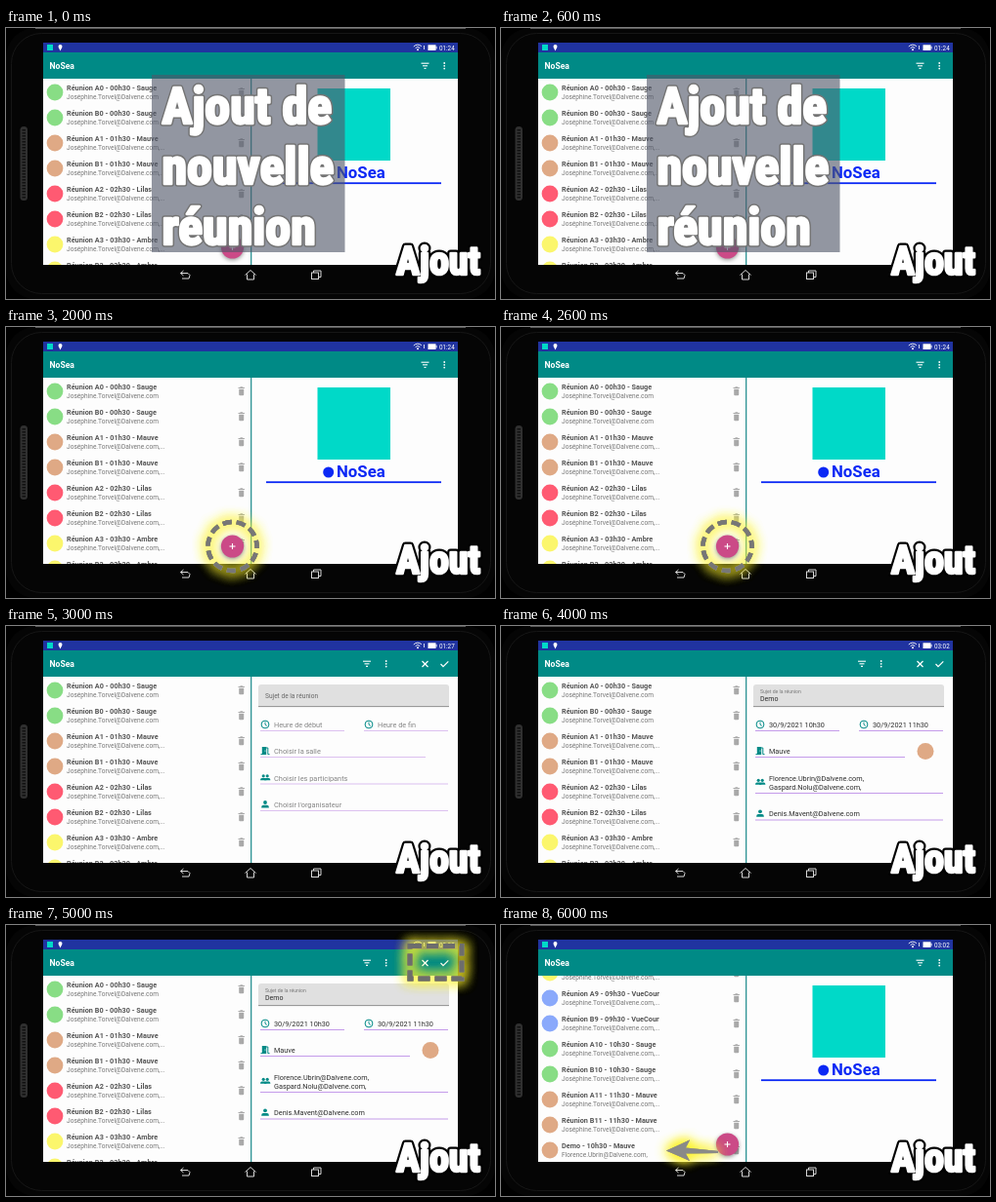
Recreate the animation shown at these times as an HTML page with a canvas. Size 500 by 278 pixels, loop 7000 ms.

```html
<!DOCTYPE html>
<html lang="fr">
<head>
<meta charset="utf-8">
<title>Ajout de nouvelle réunion</title>
<style>
  html, body { margin: 0; width: 100%; height: 100%; overflow: hidden; background: #000; }
  canvas { display: block; width: 500px; height: 278px; }
</style>
</head>
<body>
<canvas id="stage"></canvas>
<script>
const canvas = document.getElementById("stage");
const ctx = canvas.getContext("2d");
const ratio = window.devicePixelRatio || 1;
canvas.width = 500 * ratio;
canvas.height = 278 * ratio;

const TEAL = "#008a86", BLUE = "#0b28f5", LOGO = "#00d9c8", GREY = "#777", BIN = "#a9a9a9";
const GREEN = "#88dd85", TAN = "#dfa985", RED = "#ff5a72", YELLOW = "#fbf66c", SKY = "#8aa9fb";
const APP = "NoSea";
const HOST = "@Dalvene.com";
const OWNER = "Joséphine.Torvel" + HOST;
const GUEST = "Florence.Ubrin" + HOST + ",";
const ROOMS = [["Sauge", GREEN], ["Mauve", TAN], ["Lilas", RED], ["Ambre", YELLOW]];

// One entry per second of the loop.
const SCENES = [
  { time: "01:24", intro: true },
  { time: "01:24" },
  { time: "01:24", mark: ringMark },
  { time: "01:27", form: emptyForm },
  { time: "03:02", form: filledForm },
  { time: "03:02", form: filledForm, mark: boxMark },
  { time: "03:02", scrolled: true, mark: arrowMark }
];

function rect(x, y, w, h, color) {
  ctx.fillStyle = color;
  ctx.fillRect(x, y, w, h);
}

function round(x, y, w, h, r, color) {
  ctx.fillStyle = color;
  ctx.beginPath();
  ctx.roundRect(x, y, w, h, r);
  ctx.fill();
}

function disc(x, y, r, color) {
  ctx.fillStyle = color;
  ctx.beginPath();
  ctx.arc(x, y, r, 0, Math.PI * 2);
  ctx.fill();
}

function line(color, width, ...points) {
  ctx.strokeStyle = color;
  ctx.lineWidth = width;
  ctx.beginPath();
  points.forEach(([x, y]) => ctx.lineTo(x, y));
  ctx.stroke();
}

function polygon(color, ...points) {
  ctx.fillStyle = color;
  ctx.beginPath();
  points.forEach(([x, y]) => ctx.lineTo(x, y));
  ctx.fill();
}

function text(str, x, y, size, color, weight = 400) {
  ctx.font = `${weight} ${size}px Roboto, sans-serif`;
  ctx.fillStyle = color;
  ctx.fillText(str, x, y);
}

// Heavy condensed caption; the font size follows from the longest line.
function caption(lines, x, y, leading, maxSize, room, edge, edgeWidth) {
  ctx.save();
  ctx.fontStretch = "condensed";
  const setSize = size => ctx.font = `900 ${size}px "Roboto Condensed", Roboto, sans-serif`;
  setSize(maxSize);
  const widest = Math.max(...lines.map(s => ctx.measureText(s).width));
  setSize(maxSize * Math.min(1, room / widest));
  ctx.lineJoin = "round";
  lines.forEach((str, i) => {
    const base = y + i * leading;
    ctx.strokeStyle = edge;
    ctx.lineWidth = edgeWidth;
    ctx.strokeText(str, x, base);
    ctx.strokeStyle = ctx.fillStyle = "#fff";
    ctx.lineWidth = 2.6;
    ctx.strokeText(str, x, base);
    ctx.fillText(str, x, base);
  });
  ctx.restore();
}

function tablet() {
  rect(0, 0, 500, 278, "#000");
  round(0, 0, 500, 278, 30, "#050505");
  line("#555", 1, [30, 0.5], [470, 0.5]);
  ctx.strokeStyle = "#161616";
  ctx.lineWidth = 1;
  ctx.beginPath();
  ctx.roundRect(5.5, 5.5, 490, 267, 31);
  ctx.stroke();
  round(14.5, 101, 7.5, 76, 3.5, "#303030");
  for (let y = 104; y < 176; y += 3) rect(16.5, y, 3.5, 1.5, "#111");
}

function statusBar(time) {
  rect(38, 15, 424, 10, "#2033a0");
  rect(42, 17, 6, 6, LOGO);
  disc(55.5, 19, 2, "#fff");
  polygon("#fff", [53.8, 20], [57.2, 20], [55.5, 23.5]);
  ctx.strokeStyle = "#fff";
  ctx.lineWidth = 0.9;
  for (const r of [3.2, 5.6]) {
    ctx.beginPath();
    ctx.arc(421, 22.8, r, -Math.PI * 0.77, -Math.PI * 0.23);
    ctx.stroke();
  }
  disc(421, 22.3, 1, "#fff");
  line("#fff", 0.8, [427.5, 18], [427.5, 22]);
  rect(431.5, 17.3, 8, 5.7, "#fff");
  rect(439.5, 18.8, 1, 2.7, "#fff");
  text(time, 443, 22.7, 6.3, "#fff");
}

function appBar(editing) {
  const x = editing ? 369 : 428.5;
  rect(38, 25, 424, 27, TEAL);
  text(APP, 44.5, 42, 8.6, "#fff", 700);
  [4, 2.5, 1].forEach((half, i) =>
    line("#fff", 1.1, [x - half, 36.2 + i * 2.6], [x + half, 36.2 + i * 2.6]));
  for (let i = -1; i < 2; i++) disc(x + 19.7, 38.8 + i * 2.8, 0.9, "#fff");
  if (!editing) return;
  line("#fff", 1.2, [425.5, 36], [431.5, 42]);
  line("#fff", 1.2, [431.5, 36], [425.5, 42]);
  line("#fff", 1.2, [444.5, 39], [447, 41.7], [452.3, 36.3]);
}

function navBar() {
  rect(38, 243, 424, 20, "#050505");
  const ink = "#d8d8d8";
  line(ink, 1, [181.5, 249], [178.5, 251.5], [181.5, 254]);
  line(ink, 1, [178.5, 251.5], [186, 251.5], [188, 253.5], [187, 257], [180, 257]);
  line(ink, 1, [244.5, 253.5], [250, 248.5], [255.5, 253.5]);
  line(ink, 1, [246.5, 252.5], [246.5, 258], [253.5, 258], [253.5, 252.5]);
  ctx.strokeRect(312.5, 251, 7, 6.5);
  line(ink, 1, [314.5, 251], [314.5, 249], [322, 249], [322, 255.5], [319.5, 255.5]);
}

function row(y, title, mail, color) {
  disc(50, y, 8.4, color);
  text(title, 62, y - 1.6, 7.3, "#555", 700);
  text(mail, 62, y + 7.3, 6.6, "#777");
  round(238.2, y - 2.3, 5, 6.5, [0, 0, 1, 1], BIN);
  rect(237.5, y - 4, 6.4, 1, BIN);
  rect(239.4, y - 4.7, 2.6, 1, BIN);
}

function meeting(y, letter, n, [room, color]) {
  const hour = String(n).padStart(2, "0");
  row(y, `Réunion ${letter}${n} - ${hour}h30 - ${room}`, OWNER + (n ? ",..." : ""), color);
}

function meetingList(scrolled) {
  ctx.save();
  ctx.beginPath();
  ctx.rect(38, 52, 212, 191);
  ctx.clip();
  if (scrolled) {
    const rooms = { 8: ["Ambre", YELLOW], 9: ["VueCour", SKY], 10: ROOMS[0], 11: ROOMS[1] };
    for (let i = 0; i < 7; i++) {
      const n = 8 + Math.ceil(i / 2);
      meeting(49 + i * 26, i % 2 ? "A" : "B", n, rooms[n]);
    }
    row(231, "Demo - 10h30 - " + ROOMS[1][0], GUEST, TAN);
  } else {
    for (let i = 0; i < 8; i++) meeting(66 + i * 26, "AB"[i % 2], i >> 1, ROOMS[i >> 1]);
  }
  ctx.restore();
  rect(250, 52, 1.3, 191, "#2b9294");
}

function addButton() {
  ctx.save();
  ctx.shadowColor = "rgba(0,0,0,.4)";
  ctx.shadowBlur = 4 * ratio;
  ctx.shadowOffsetY = 1.5 * ratio;
  disc(231.5, 225, 11.6, "#cb4a87");
  ctx.restore();
  line("#fff", 1.1, [228.5, 225], [234.5, 225]);
  line("#fff", 1.1, [231.5, 222], [231.5, 228]);
}

function welcome() {
  rect(318.5, 62, 74.5, 74, LOGO);
  disc(329.7, 149, 5.5, BLUE);
  text(APP, 338, 154.2, 16.8, BLUE, 700);
  rect(266, 158.3, 179, 1.8, BLUE);
}

function clock(x, y) {
  ctx.strokeStyle = TEAL;
  ctx.lineWidth = 1;
  ctx.beginPath();
  ctx.arc(x, y, 3.9, 0, Math.PI * 2);
  ctx.stroke();
  line(TEAL, 0.9, [x, y - 2.5], [x, y + 0.2], [x + 1.8, y + 1.4]);
}

function door(x, y) {
  rect(x - 3.2, y - 4, 4.4, 8, TEAL);
  line(TEAL, 1, [x - 4.5, y + 3.6], [x - 3, y + 3.6]);
  line(TEAL, 1, [x + 1, y - 3], [x + 2.8, y - 3], [x + 2.8, y + 3.6], [x + 4.5, y + 3.6]);
  disc(x, y, 0.6, "#fff");
}

function person(x, y, s = 1) {
  disc(x, y - 2 * s, 1.9 * s, TEAL);
  round(x - 3.8 * s, y + 0.7 * s, 7.6 * s, 2.8 * s, [2 * s, 2 * s, 0, 0], TEAL);
}

function people(x, y) {
  person(x - 1.8, y, 0.82);
  person(x + 2.2, y, 0.82);
}

function underline(x1, x2, y, color) {
  rect(x1, y - 0.5, x2 - x1, 1, color);
}

function subjectBox() {
  round(258, 60, 195, 23, [3, 3, 0, 0], "#e0e0e0");
  rect(258, 82.2, 195, 0.9, "#888");
}

function dates(start, end, ink, rule) {
  clock(265, 101);
  clock(371, 101);
  text(start, 274, 103.7, 7.3, ink);
  text(end, 380, 103.7, 7.3, ink);
  underline(260, 346, 107.5, rule);
  underline(366, 452, 107.5, rule);
}

function emptyForm() {
  const ink = "#858585", rule = "#dcc0f0";
  subjectBox();
  text("Sujet de la réunion", 265, 74, 6.6, "#666");
  dates("Heure de début", "Heure de fin", ink, rule);
  door(265, 128);
  text("Choisir la salle", 274, 131, 7.4, ink);
  underline(260, 429, 134.5, rule);
  people(265, 155.5);
  text("Choisir les participants", 274, 158.5, 7.4, ink);
  underline(260, 452, 162, rule);
  person(265, 183);
  text("Choisir l'organisateur", 274, 186, 7.4, ink);
  underline(260, 452, 189.5, rule);
}

function filledForm() {
  const ink = "#2c2c2c", rule = "#c49bea";
  subjectBox();
  text("Sujet de la réunion", 265, 68.6, 5.1, "#777");
  text("Demo", 265, 77, 7, ink);
  dates("30/9/2021 10h30", "30/9/2021 11h30", ink, rule);
  door(265, 128);
  text(ROOMS[1][0], 274, 131, 7.3, ink);
  underline(260, 413, 134.5, rule);
  disc(434, 128.5, 8.5, TAN);
  people(265, 160);
  text(GUEST, 274, 158.7, 7.3, ink);
  text("Gaspard.Nolu" + HOST + ",", 274, 167.8, 7.3, ink);
  underline(260, 452, 171.5, rule);
  person(265, 192.3);
  text("Denis.Mavent" + HOST, 274, 195, 7.3, ink);
  underline(260, 452, 199, rule);
}

function glowing(paint) {
  ctx.save();
  ctx.shadowColor = "#fff32a";
  ctx.shadowBlur = 13 * ratio;
  for (let i = 0; i < 4; i++) paint();
  ctx.restore();
}

function ringMark() {
  glowing(() => {
    const step = Math.PI * 50 / 11;
    ctx.strokeStyle = GREY;
    ctx.lineWidth = 4.5;
    ctx.setLineDash([step * 0.64, step * 0.36]);
    ctx.lineDashOffset = step / 2;
    ctx.beginPath();
    ctx.arc(231.5, 225, 25, 0, Math.PI * 2);
    ctx.stroke();
  });
}

function boxMark() {
  glowing(() => {
    ctx.strokeStyle = "#6d6d6d";
    ctx.lineWidth = 5;
    ctx.setLineDash([12, 5]);
    ctx.strokeRect(413, 21.5, 53, 33.5);
  });
}

function arrowMark() {
  glowing(() => polygon("#8a8a88",
    [169, 231.5], [193, 220.5], [189, 228.5], [222, 232], [222, 234], [189, 234.5], [193, 242]));
}

function intro() {
  rect(149, 48, 197.5, 182, "rgba(82,88,106,.62)");
  caption(["Ajout de", "nouvelle", "réunion"], 159.5, 98, 62, 56, 176, "#747474", 5.5);
}

function draw(now) {
  const scene = SCENES[Math.floor(now / 1000) % SCENES.length];
  ctx.setTransform(ratio, 0, 0, ratio, 0, 0);
  tablet();
  rect(38, 52, 424, 191, "#fdfdfd");
  statusBar(scene.time);
  appBar(Boolean(scene.form));
  meetingList(scene.scrolled);
  navBar();
  if (scene.form) scene.form();
  else {
    welcome();
    if (scene.mark !== ringMark) addButton();
  }
  if (scene.mark) scene.mark();
  if (scene.mark === ringMark) addButton();
  if (scene.intro) intro();
  caption(["Ajout"], 399, 252.5, 0, 45, 86, "#000", 7);
}

let start;
function tick(now) {
  start ??= now;
  draw(now - start);
  requestAnimationFrame(tick);
}
requestAnimationFrame(tick);
</script>
</body>
</html>
```
